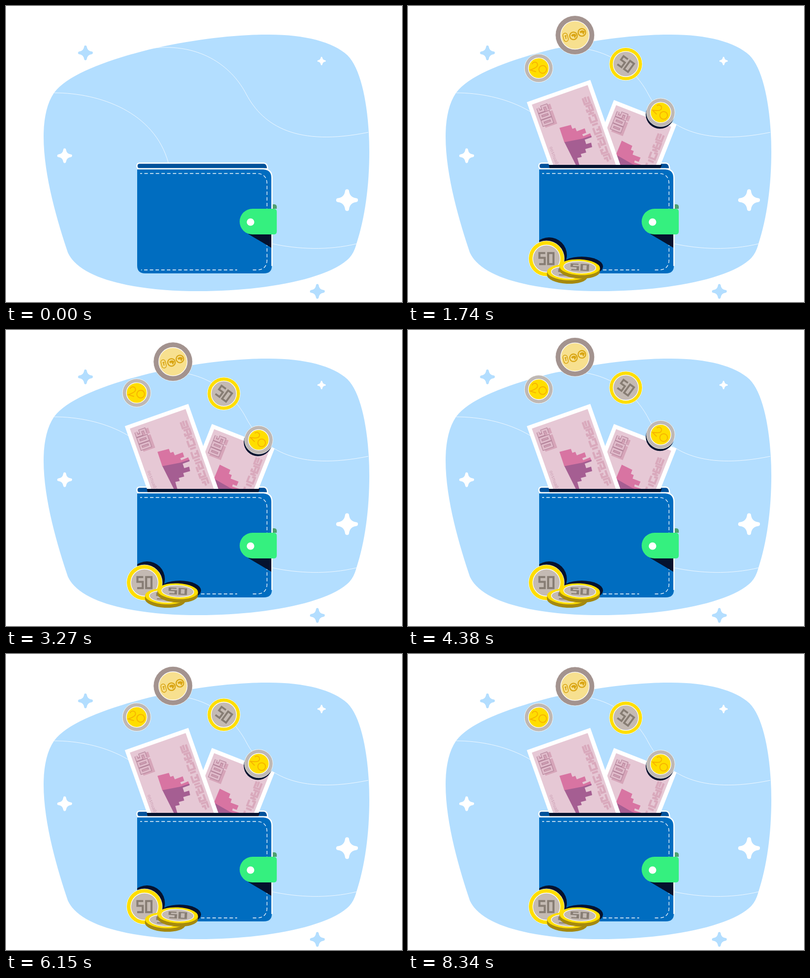
These frames come from a looping animation (800x600 px, 8.91 s). An HTML page:

```html
<!DOCTYPE html>
<html lang="en">
<head>
<meta charset="utf-8">
<title>Wallet</title>
<style>
  html, body { margin: 0; width: 100%; height: 100%; overflow: hidden; background: #fff; }
  svg { display: block; width: 100vw; height: 100vh; }
  text { font-family: "DejaVu Sans Mono", monospace; }
</style>
</head>
<body>
<svg id="stage" viewBox="0 0 800 600"></svg>
<script>
const LOOP = 8910, STEP = 30, FLOAT = 2400;
const NAVY = '#05122e', YELLOW = '#ffde00', GREY = '#c4bab3', SKY = '#b3deff', AMBER = '#d9a514';

const group = (id, body, attrs = '') => `<g id="${id}" ${attrs}>${body}</g>`;
const path = (d, attrs) => `<path d="${d}" ${attrs}/>`;
const line = (d, color, width, extra = '') =>
  path(d, `fill="none" stroke="${color}" stroke-width="${width}" ${extra}`);
const circle = (x, y, r, fill, extra = '') =>
  `<circle cx="${x}" cy="${y}" r="${r}" fill="${fill}" ${extra}/>`;

const FIFTY = 'M-2.5-11.5H-14.5V-1.5H-3.5V11.5H-15M3.5-11.5H14.5V11.5H3.5Z';
const FIVE_HUNDRED = 'M-10-9H-18V0H-10V9H-18M-4-9H4V9H-4Z M10-9H18V9H10Z';

function sparkle(x, y, r, fill) {
  const d = 'M0-18Q2-2 18 0Q2 2 0 18Q-2 2-18 0Q-2-2 0-18Z';
  return path(d, `fill="${fill}" stroke="${fill}" stroke-width="8" stroke-linejoin="round"
    transform="translate(${x} ${y}) scale(${r / 22})"`);
}

function coin(r, ring, inner, face, mark) {
  return circle(0, 0, r, ring, 'stroke="#fff" stroke-width=".8"') +
    circle(0, 0, inner, face, 'stroke="#fff" stroke-width="1.3"') + mark;
}

const fifty = (r, inner, angle, scale) => coin(r, YELLOW, inner, GREY,
  line(FIFTY, '#877d74', 4.2, `transform="rotate(${angle}) scale(${scale})"`));

const twenty = angle => coin(28.7, '#bfb8b4', 20.7, YELLOW,
  `<g transform="rotate(${angle})">` +
  line('M-15-4C-15-11.5-4-11.5-4-4C-4 0-9 4-15 8.5H-3', '#f7b500', 2) +
  circle(8.5, 0, 7.8, 'none', 'stroke="#f7b500" stroke-width="2"') + '</g>');

const zero = (x, y) => circle(x, y, 7.6, 'none', `stroke="${AMBER}" stroke-width="2.3"`) +
  path(`M${x - 5} ${y - 1}Q${x} ${y - 7} ${x + 6} ${y - 2}L${x + 3} ${y + 5}L${x} ${y}L${x - 2} ${y + 2}Z`,
    `fill="${AMBER}"`);
const hundred = coin(39.5, '#a3938f', 28.7, '#f7e08f',
  `<rect x="-23.5" y="-4" width="9" height="17" rx="4.5" fill="none" stroke="${AMBER}"
    stroke-width="1.6" transform="rotate(-14 -19 4)"/>` +
  line('M-21 2L-17 1M-19 2L-18 8', AMBER, 2) + zero(-3, 1.5) + zero(14, -5.5));

const lying = `<g transform="rotate(3)">` +
  path('M-41 0V7A41 16 0 0 0 41 7V0Z', 'fill="#a5890f"') +
  `<ellipse rx="41" ry="16" fill="${YELLOW}"/>
   <ellipse rx="32.5" ry="12" fill="${GREY}" stroke="#fff" stroke-width="1.2"/>` +
  line(FIFTY, '#877d74', 4.4, 'transform="scale(1.12 .5)"') + '</g>';

// Banknote in its own axes, top left corner at 0,0.
const note = `<rect width="136" height="230" fill="#fff"/>
  <rect x="8" y="8" width="119.5" height="222" fill="#e6c8d5"/>
  <g transform="translate(26 37) rotate(90)">
    ${line(FIVE_HUNDRED, '#d6a5b9', 7, 'transform="translate(3 -5)"')}
    ${line(FIVE_HUNDRED, '#aa7890', 5.8)}
    ${line(FIVE_HUNDRED, '#dfb9c9', 4)}
  </g>` +
  line('M109 30V43H120V30M114 29V40M109 48H121V59H109V54M115 48V64M109 65H121M109 70V82H121V70H115' +
    'M109 88H121M109 94V107H121V94M114 100H121M109 113H121M109 119H121V132H114V122' +
    'M109 126V137M120 137V149H109V142H114M109 154H121V166M109 160H115V168', '#d9a9bc', 4.2) +
  `<text transform="translate(13 101) rotate(90)" font-size="9" fill="#cba0b4">oosnua01 lmo</text>
  <g transform="rotate(19.4) translate(-240 -195)">
    <path fill="#d874a2" d="M306 247L329 241L332 249L338 247L341 254L357 248L360 257L352 260L354 264L368 258L371 265L352 272L316 277Z"/>
    <path fill="#a55e92" d="M316 276L352 269L370 263L371 266L357 271L360 280L370 277L372 286L358 290L360 297L349 300L351 306L342 308L346 322L339 322Z"/>
  </g>`;

const BODY = 'M265 331H520Q537 331 537 348V527Q537 542 521 542H281Q265 542 265 526Z';

stage.innerHTML = `
  <defs>
    <clipPath id="above"><rect width="800" height="322"/></clipPath>
    <clipPath id="leather"><path d="${BODY}"/></clipPath>
  </defs>
  <rect width="800" height="600" fill="#fff"/>` +
  path('M97 176C125 138 210 108 290 88C375 68 460 58 525 58C600 57 660 72 690 100' +
    'C720 130 734 215 734 295C734 365 725 430 708 482C703 500 697 508 689 515' +
    'C640 557 510 578 390 578C265 578 150 555 125 500C105 440 76 345 76 265C76 230 82 198 97 176Z',
    `fill="${SKY}"`) +
  line('M97 176C190 176 300 215 328 318M290 86C400 72 460 130 485 178C520 245 590 285 732 256' +
    'M538 482C590 493 650 496 708 482', '#fff', 1, 'opacity=".8"') +
  sparkle(160.5, 95, 15, SKY) + sparkle(629, 578.5, 15, SKY) +
  sparkle(118.5, 303.5, 15, '#fff') + sparkle(637.5, 111.5, 8.5, '#fff') +
  sparkle(689, 393.5, 22, '#fff') +
  `<path d="M270 318.5H521Q528 319 528.5 330H270Q264.5 330 264.5 324.2Q264.5 318.5 270 318.5Z"
    fill="#00529b" stroke="#fff" stroke-width="2.4"/>
  <g clip-path="url(#above)">` + group('noteB', note) + group('noteA', note) + '</g>' +
  group('slot', path('M284.5 322H513L510 328.7H286Z', `fill="${NAVY}"`)) +
  path(BODY, 'fill="#006dc0"') +
  line('M265 330H520Q537.3 331 537.3 348V527', '#fff', 2.5) +
  line('M271 339.5H506Q527.3 339.5 527.3 361V514Q527.3 535 506 535H498M467 535H273', '#fff', 1.3,
    'stroke-dasharray="7 4.5" stroke-dashoffset="3"') +
  `<path d="M539 411V402H543Q547 403 547 407V411Z" fill="#4f9f70"/>
  <path d="M489 462L536 462V490Z" fill="${NAVY}"/>
  <path d="M498 411H541Q547 411 547 417V457Q547 463 541 463H498A26 26 0 0 1 498 411Z" fill="#35f07f"/>` +
  circle(494, 438, 7.6, '#fff') +
  group('shadows', circle(285, 505, 36, NAVY) +
    `<ellipse cx="351" cy="528" rx="43" ry="20" fill="${NAVY}"/>`, 'clip-path="url(#leather)"') +
  group('standing', fifty(36, 27.5, 0, .98)) +
  group('lower', lying) + group('upper', lying) +
  group('left20', twenty(17)) + group('top100', hundred) +
  group('top50', fifty(33.2, 25.6, 36, .9)) +
  group('right20', circle(-1.5, 4.3, 28.7, NAVY) + twenty(45));

const parts = Object.fromEntries([...stage.querySelectorAll('g[id]')].map(g => [g.id, g]));
const clamp = v => Math.min(1, Math.max(0, v));
const easeOut = (p, power) => 1 - (1 - clamp(p)) ** power;
const easeInOut = p => p < .5 ? 2 * p * p : 1 - 2 * (1 - p) ** 2;

// Row: [time, ...values]; every segment slows down towards its end.
function tween(t, rows, power = 2) {
  if (t < rows[0][0]) return rows[0].slice(1);
  const next = rows.findIndex(row => row[0] > t);
  if (next < 0) return rows.at(-1).slice(1);
  const a = rows[next - 1], b = rows[next];
  const p = easeOut((t - a[0]) / (b[0] - a[0]), power);
  return a.slice(1).map((v, i) => v + (b[i + 1] - v) * p);
}

// Three slow bobs up and down, ending at rest.
function bob(t, start, height, ramp = 1) {
  const dt = Math.min(Math.max(t - start, 0), 3 * FLOAT);
  const phase = dt / FLOAT * 2 % 2;
  return -height * clamp(dt / ramp) * easeInOut(Math.min(phase, 2 - phase));
}

// Entry rows: [time, dx, dy, scale, angle]
const coins = [
  { id: 'standing', x: 279.7, y: 512, rows: [[420, -62, 0, .8, -110], [840, 0, 0, 1, 0]] },
  { id: 'lower', x: 322, y: 540, rows: [[450, 0, 25, .7, 0], [690, 0, -3, 1, 0], [960, 0, 0, 1, 0]] },
  { id: 'upper', x: 347, y: 529.5, rows: [[480, 0, 34, .6, 0], [690, 0, -23.5, .88, 0], [1020, 0, 0, 1, 0]] },
  { id: 'top50', x: 440, y: 129.3, rows: [[570, 0, -92, .8, 0], [1070, 0, 0, 1, 0]], bob: [750, 12.4] },
  { id: 'top100', x: 337.3, y: 65.5, rows: [[675, 0, -44, .5, 0], [1175, 0, 0, 1, 0]], bob: [1140, 13] },
  { id: 'right20', x: 510.5, y: 223.5, rows: [[900, 197, 0, .5, 0], [1400, 0, 0, 1, 0]], bob: [1080, 13], power: 3 },
  { id: 'left20', x: 264, y: 128.5, rows: [[975, -81, 0, .5, 0], [1475, 0, 0, 1, 0]], bob: [1140, 10, 1200], power: 3 }
];

const show = (id, on) => parts[id].setAttribute('visibility', on ? 'visible' : 'hidden');
const place = (id, transform) => parts[id].setAttribute('transform', transform);

function draw(t) {
  for (const id of ['slot', 'noteA', 'noteB']) show(id, t >= 120);
  const [riseA] = tween(t, [[120, 190], [600, 0]]);
  const [riseB] = tween(t, [[180, 155], [660, 0]]);
  place('noteA', `translate(240 195) rotate(-19.4) translate(0 ${riseA})`);
  place('noteB', `translate(416 190.5) rotate(21.5) translate(0 ${riseB})`);
  parts.shadows.setAttribute('opacity', clamp((t - 600) / 400));

  for (const c of coins) {
    const [dx, dy, scale, angle] = tween(t, c.rows, c.power);
    const y = c.y + dy + (c.bob ? bob(t, ...c.bob) : 0);
    show(c.id, t >= c.rows[0][0]);
    place(c.id, `translate(${c.x + dx} ${y}) rotate(${angle}) scale(${scale})`);
  }
}

const begin = performance.now();
function frame(now) {
  const t = Math.max(0, now - begin) % LOOP;
  draw(Math.floor(t / STEP) * STEP);
  requestAnimationFrame(frame);
}
draw(0);
requestAnimationFrame(frame);
</script>
</body>
</html>
```
